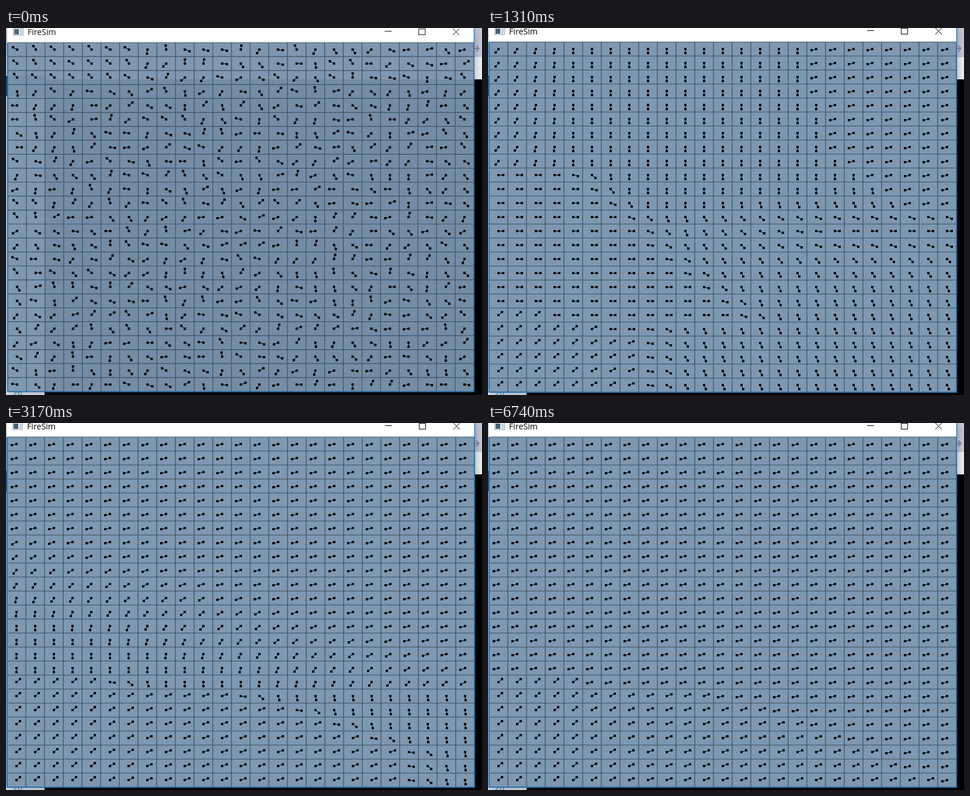
Recreate the animation shown at these times as an HTML page with a canvas. Size 815 px wide and 629 px high, loop 6840 ms.

```html
<!DOCTYPE html>
<html lang="en">
<head>
<meta charset="utf-8">
<title>FireSim</title>
<style>
html, body { margin: 0; width: 100%; height: 100%; overflow: hidden; background: #000; }
canvas { display: block; }
</style>
</head>
<body>
<canvas id="stage" width="815" height="629"></canvas>
<script>
const ctx = document.getElementById('stage').getContext('2d');
const N = 25, LOOP = 6840, RAD = Math.PI / 180;
const FONT = '"Open Sans", "Noto Sans", sans-serif';
const clamp = v => Math.max(0, Math.min(1, v));

let seed = 29;
const rnd = () => (seed = (seed * 16807) % 2147483647) / 2147483647;

// Simulation step on screen at time t: even ticks with three short pauses
function stepAt(t) {
  const run = (first, start, last) => first + Math.min(last, Math.floor((t - start) / 92.4));
  if (t < 280) return t < 100 ? 0 : 1;
  return t < 930 ? run(2, 280, 5) : t < 1820 ? run(8, 930, 8) : run(17, 1820, 53);
}

// Wind angles are in degrees, clockwise from right.
// LEFT is the settled wind; below the hill's curved edge it blows uphill instead.
const LEFT = 160;
const edge = r => r < 17 ? -1 : 4 + 7.3 * Math.sqrt(r - 17);
const uphill = c => -48 + 23 * clamp((c - 2) / 6);
const turn = n => clamp((n - .7) / 2.6);
const valley = (r, mid, width) => 1 - Math.exp(-(((r - mid) / width) ** 2));
const upper = (r, c, reach) =>
  c >= 17 + (r > 3) + (r > 7) ? LEFT : 90 + 33 * clamp((reach - c) / 4);

function noise(r, c) {
  const a = rnd() * 180, up = rnd() < .3;
  return r < 3 && c < 7 ? 215 + a / 6 : up ? a + 180 : a;
}
function early(r, c) {
  if (r < 5) return upper(r, c, 8);
  if (r > 18 && c <= 2 + .9 * (r - 19)) return uphill(c);
  const mid = 16 - .37 * c;
  const goal = r < mid ? 75 : 45 + 40 * clamp((r - 13) / 4);
  const side = r < 15 ? clamp(c / 4) : 1;
  return (goal + 12) * valley(r, mid, 3) * side - 12 * (1 - side);
}
function mixing(r, c) {
  if (r < 9) return upper(r, c, 4);
  if (r < 12 && c >= r + 11) return LEFT;
  if (r > 18 && c <= Math.min(7, 2 + 3 * (r - 19))) return uphill(c);
  const front = r < 20 ? 3 + .85 * (r - 9) : 7;
  const dip = 1 - clamp((c - 10) / 8) * (1 - valley(r, 13, 1.8));
  return 4 + (r < 12 ? 88 : 65) * turn(c - front) * dip;
}
function turning(r, c) {
  if (r < 17) {
    const bound = r < 6 ? 12 : 17.5 + .09 * (r - 6) ** 2;
    return c >= bound ? LEFT : 90 + 35 * clamp((r - 11) / 4) * clamp(1 - c / 13);
  }
  if (r < 20 && c < 10 && c > 1 + 2 * (r - 17)) return 3;
  const e = Math.min(15.5, edge(r));
  return c <= e ? uphill(c) : (r > 18 && r < 23 ? 60 : 88) * turn(c - Math.floor(e));
}
function settling(r, c) {
  const e = Math.min(20, edge(r)), a = LEFT - 70 * clamp(.154 * (r - 6) - .06 * c);
  if (r < 17) return a;
  return c <= e ? uphill(c) : (r < 18 ? a : 85) * turn(c - Math.floor(e));
}
const nearlyStill = (r, c) => c <= edge(r) ? uphill(c)
  : LEFT - 35 * clamp((r - 9.5) / 6) * clamp(1 - c / 18);
const still = (r, c) => c <= edge(r) ? uphill(c) : LEFT;

const fields = [noise, early, mixing, turning, settling, nearlyStill, still]
  .map(f => Array.from({ length: N * N }, (_, i) => f(Math.floor(i / N), i % N)));
const marks = [0, 7, 12, 18, 31, 43, 70];
const fronts = [0, 5, 9, 17];

// Where a front crosses the grid, each cell turns as the front reaches it
function progress(k, u, r, c) {
  let d = -1;
  if (k < 3 && r >= fronts[k] && r < fronts[k + 1]) {
    d = (r - fronts[k]) / (fronts[k + 1] - fronts[k]);
  }
  if (k === 3 && r < 7) d = clamp((11 - c) / 11);
  if (k === 5 && r > 9 && r < 17) d = (r - 10) / 6;
  return d < 0 ? u : clamp((u - .75 * d) / .25);
}

function box(color, x, y, w, h) {
  ctx.fillStyle = color;
  ctx.fillRect(x, y, w, h);
}
function label(s, x, y, size, color) {
  ctx.font = size + 'px ' + FONT;
  ctx.fillStyle = color;
  ctx.fillText(s, x, y);
  return ctx.measureText(s).width;
}
function path(color, width, ...lines) {
  ctx.strokeStyle = color;
  ctx.lineWidth = width;
  ctx.beginPath();
  for (const [x1, y1, x2, y2] of lines) {
    ctx.moveTo(x1, y1);
    ctx.lineTo(x2, y2);
  }
  ctx.stroke();
}

function drawDesktop() {
  box('#000', 0, 0, 815, 629);
  box('#cccfdf', 0, 0, 815, 50);
  box('#f6f7fa', 0, 50, 815, 38);
  box('#e3e8ee', 0, 50, 66, 579);
  box('#1c4a78', 0, 82, 66, 35);
  let x = 70;
  for (const s of 'View Project Build Debug Team Tools Test Analyze Window Help'.split(' ')) {
    x += label(s, x, 11, 15, '#1e1e1e') + 24;
  }
  label('Main', 8, 109, 14, '#fff');
  label('firesim', 2, 136, 14, '#234b75');
  for (let i = 14; i <= 26; i++) label(i, 12, 630 - 22.5 * (26 - i), 14, '#2b7fae');
  path('#8d90a0', 2, [800, 35, 809, 35], [805, 30, 810, 35], [805, 40, 810, 35]);
}

function drawChrome() {
  ctx.shadowColor = 'rgba(0,0,0,.4)';
  ctx.shadowBlur = 20;
  box('#fff', 1, -2, 802, 26);
  box('#7e98b1', 2, 24, 800, 600);
  ctx.shadowColor = 'transparent';
  box('#fff', 1, -2, 802, 26);
  box('#9babb5', 11, -2, 18, 14);
  box('#eef3f6', 12, 0, 16, 11);
  box('#466274', 13, 1, 8, 9);
  box('#c4d0d8', 23, 1, 4, 9);
  label('FireSim', 36, 11, 14.2, '#000');
  path('#000', 1, [649, 4.5, 661, 4.5], [766, 0, 777, 11], [777, 0, 766, 11]);
  ctx.strokeRect(707.5, .5, 11, 10);
  const lines = [];
  for (let i = 0; i <= N; i++) {
    lines.push([2 + 32 * i, 24, 2 + 32 * i, 624], [2, 24 + 24 * i, 802, 24 + 24 * i]);
  }
  path('#38505f', 1.2, ...lines);
  path('#1878cc', 1.4, [1.5, 24, 1.5, 625], [802.5, 0, 802.5, 625], [1, 624.5, 803, 624.5]);
}

function drawWind(step) {
  let k = 0;
  while (k < marks.length - 2 && step >= marks[k + 1]) k++;
  const u = (step - marks[k]) / (marks[k + 1] - marks[k]);
  const from = fields[k], to = fields[k + 1], stems = [];
  ctx.fillStyle = '#000';
  for (let i = 0; i < N * N; i++) {
    const r = Math.floor(i / N), c = i % N;
    const delta = ((to[i] - from[i]) % 360 + 540) % 360 - 180;
    const a = (from[i] + delta * progress(k, u, r, c)) * RAD;
    const x = 18 + 32 * c, y = 36 + 24 * r;
    const tx = x + 8.5 * Math.cos(a), ty = y + 7 * Math.sin(a);
    ctx.fillRect(x - 2, y - 2, 4, 4);
    ctx.fillRect(Math.round(tx - 2), Math.round(ty - 2), 4, 4);
    stems.push([x, y, tx, ty]);
  }
  path('#000', 1, ...stems);
}

function draw(step) {
  drawDesktop();
  ctx.save();
  if (step === 0) {
    // The window is still opening
    ctx.globalAlpha = .93;
    ctx.transform(.9975, 0, 0, .9967, 1, 1.1);
  }
  drawChrome();
  ctx.globalAlpha = 1;
  drawWind(step);
  ctx.restore();
}

const start = performance.now();
let shown = -1;
function tick() {
  const step = stepAt((performance.now() - start) % LOOP);
  if (step !== shown) draw(shown = step);
  requestAnimationFrame(tick);
}
tick();
</script>
</body>
</html>
```
